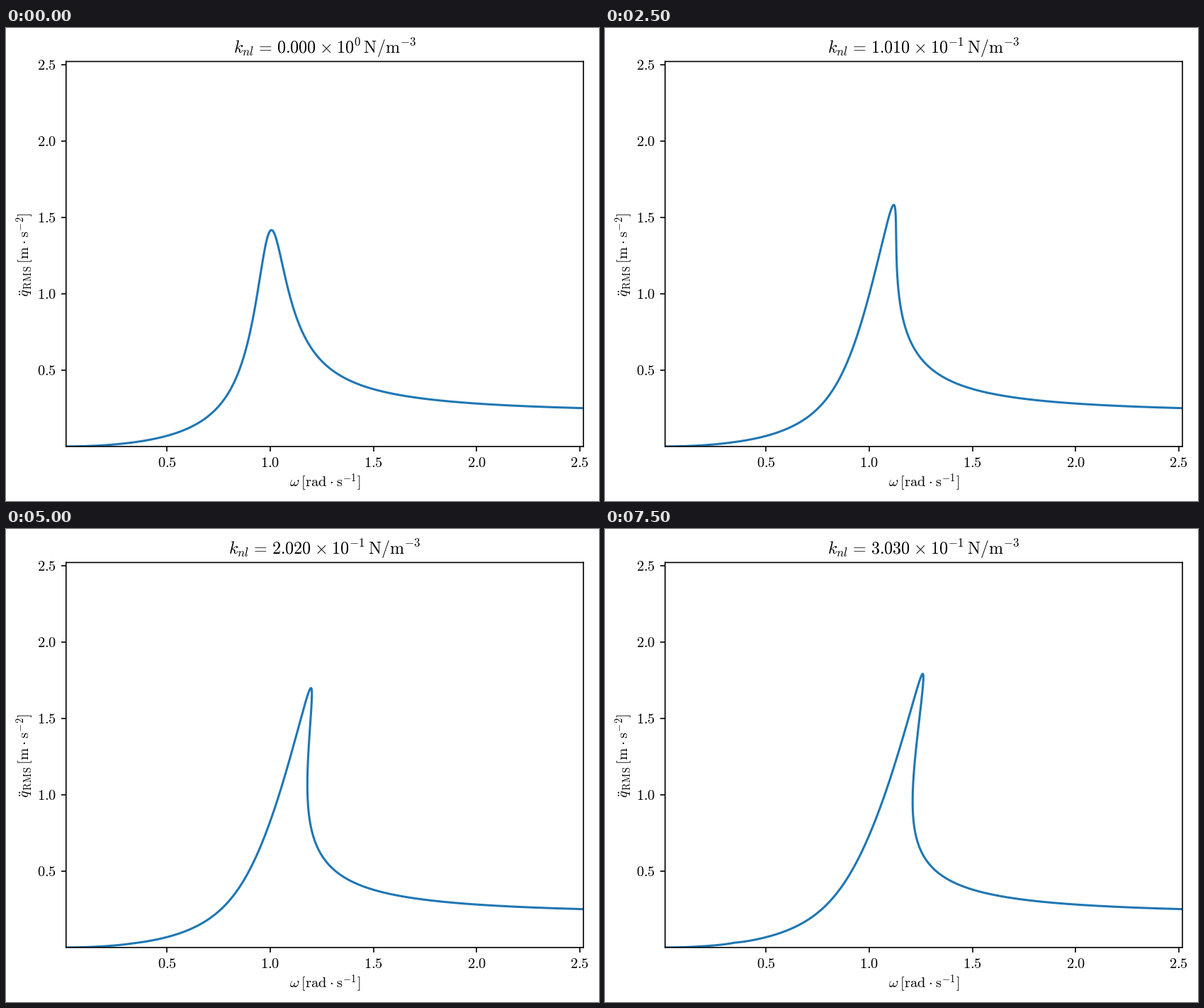
Write a matplotlib script that moves like this. It is 837 px wide and 669 px high and loops after 8000 ms.

```python
import numpy as np
import matplotlib.pyplot as plt
from matplotlib.animation import FuncAnimation

W, H, DPI = 837, 669, 128
PT = 1.15                      # scale of all point sizes
FRAMES, INTERVAL = 16, 500
LEFT, RIGHT, TOP, BOTTOM = 84.8, 815.0, 47.4, 591.9
X0, X1, Y1 = 0.01, 2.518, 2.523

FORCE, DAMP = 0.3, 0.15
DK = 2 / 99                    # stiffness step per frame

plt.rcParams["mathtext.fontset"] = "cm"

# operators with the wider spacing of TeX
EQ = r"\hspace{0.11}=\hspace{0.11}"
TIMES = r"\hspace{0.05}\times\hspace{0.05}"
DOT = r"\hspace{0.05}\cdot\hspace{0.05}"


def response(k):
    """Frequency response of a Duffing oscillator with two harmonics,
    followed along the phase lag so that folded branches come out whole."""
    w0 = np.concatenate([np.linspace(0.004, 0.8, 300),
                         np.linspace(0.801, 1.3, 700),
                         np.linspace(1.302, 2.6, 300)])
    lag = np.angle(1 - w0**2 + 1j * DAMP * w0)
    fc, fs = FORCE * np.cos(lag), FORCE * np.sin(lag)
    z = np.zeros_like(w0, dtype=complex)       # third harmonic
    damp = np.full_like(w0, DAMP)
    stiff = np.ones_like(w0)
    for _ in range(24):
        a = np.full_like(w0, 4.0)              # Newton from above
        for _ in range(14):
            f = 0.75 * k * a**4 + stiff * a**2 - fc * a - (fs / damp)**2
            a = a - f / (3 * k * a**3 + 2 * stiff * a - fc)
        w = fs / (damp * a)
        den = (1 + 1.5 * k * a**2 + 0.75 * k * abs(z)**2
               - 9 * w**2 + 3j * DAMP * w)
        z = 0.5 * z - 0.5 * (k * a**3 / 4) / den
        shift = 0.75 * k * (a * z + 2 * abs(z)**2)
        stiff = 1 + shift.real
        damp = DAMP + shift.imag / w
    rms = w**2 * np.sqrt((a**2 + 81 * abs(z)**2) / 2)
    return w, rms


def title_text(k):
    mant, exp = f"{k:.3e}".split("e")
    return (rf"$k_{{nl}} {EQ} {mant} {TIMES} 10^{{{int(exp)}}}"
            r"\,\mathrm{N}/\mathrm{m}^{-3}$")


fig = plt.figure(figsize=(W / DPI, H / DPI), dpi=DPI, facecolor="white")
ax = fig.add_axes([LEFT / W, 1 - BOTTOM / H,
                   (RIGHT - LEFT) / W, (BOTTOM - TOP) / H])
ax.set(xlim=(X0, X1), ylim=(0, Y1))
for spine in ax.spines.values():
    spine.set_linewidth(0.8 * PT)
    spine.set_snap(False)

ticks = np.arange(1, 6) / 2
ax.set_xticks(ticks)
ax.set_yticks(ticks)
ax.tick_params(length=3.5 * PT, width=0.8 * PT,
               labelbottom=False, labelleft=False)


def label(x, y, s, size=10, ha="center", **kw):
    return fig.text(x / W, 1 - y / H, s, fontsize=size * PT, ha=ha,
                    va="baseline", rotation_mode="anchor", **kw)


for t in ticks:
    px = LEFT + (t - X0) / (X1 - X0) * (RIGHT - LEFT)
    py = BOTTOM - t / Y1 * (BOTTOM - TOP)
    label(px, 621, f"${t:.1f}$")
    label(71, py + 6.9, f"${t:.1f}$", ha="right")

mid_x, mid_y = (LEFT + RIGHT) / 2, (TOP + BOTTOM) / 2
label(mid_x, 649.2,
      rf"$\omega\,\hspace{{0.06}}[\mathrm{{rad}} {DOT} \mathrm{{s}}^{{-1}}]$")
label(32.7, mid_y + 0.5,
      r"$\ddot{q}_{\mathrm{R\hspace{0.07}M\hspace{0.07}S}}"
      rf"\,[\mathrm{{m}} {DOT} \mathrm{{s}}^{{-2}}]$", rotation=90)
title = label(mid_x, 35.5, title_text(0), size=11.8)

line, = ax.plot([], [], color="#1f77b4", lw=1.5 * PT)


def draw(i):
    k = i * DK
    line.set_data(*response(k))
    title.set_text(title_text(k))
    return line, title


anim = FuncAnimation(fig, draw, frames=FRAMES, interval=INTERVAL,
                     repeat=True, repeat_delay=0)
plt.show()
```
